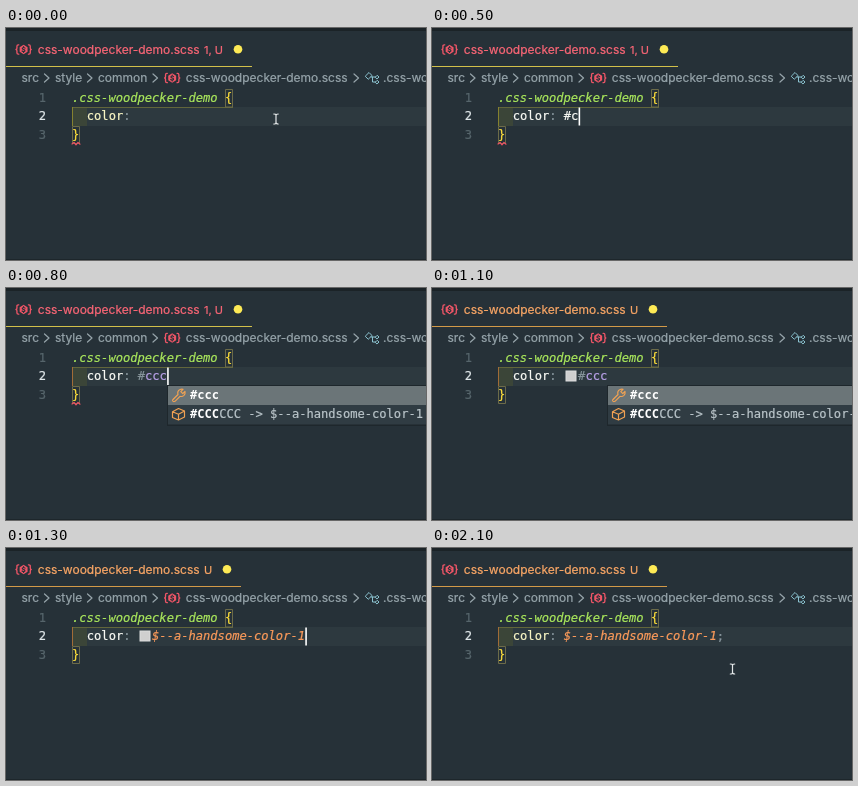
These frames come from a looping animation (420 by 232 pixels, 2.2 s). An HTML page:

```html
<!DOCTYPE html>
<html lang="en">
<head>
<meta charset="utf-8">
<title>Stylesheet autocompletion</title>
<style>
html, body { margin: 0; width: 100%; height: 100%; overflow: hidden; background: #263138; }
svg { display: block; width: 420px; height: 232px; }
text { white-space: pre; }
text, tspan { fill: currentColor; stroke: currentColor; stroke-width: .22px; }
.ui { font: 12px Inter, "Open Sans", sans-serif; color: #97a5ab; }
.code { font: 12.1px "DejaVu Sans Mono", "Liberation Mono", monospace; color: #f8f9f4; }
.num { color: #56656b; }
.current { color: #dfe6e9; }
.selector { color: #aae85c; font-style: italic; }
.brace { color: #ffdf3a; }
.dim { color: #87959c; }
.hex { color: #b7a0e6; }
.var { color: #fb9a5a; font-style: italic; }
.bold { font-weight: bold; color: #fff; stroke-width: 0; }
.option { color: #b9c4c9; }
.line { fill: none; stroke-width: 1.2; stroke-linecap: round; stroke-linejoin: round; }
</style>
</head>
<body>
<svg viewBox="0 0 420 232">
  <defs>
    <g id="file" transform="scale(.9)">
      <path class="line" stroke="#ee5567" style="stroke-width:1.5" d="M-5.4-5.2h-.6q-1.4 0-1.4 1.5v2q0 1.5-1 1.7q1 .2 1 1.7v2q0 1.5 1.4 1.5h.6M5.4-5.2h.6q1.4 0 1.4 1.5v2q0 1.5 1 1.7q-1 .2-1 1.7v2q0 1.5-1.4 1.5h-.6"/>
      <path fill="#ee5567" d="M0-5.2L4.4-2.6V2.6L0 5.2L-4.4 2.6V-2.6Z"/>
      <path class="line" stroke="#263138" d="M1.6-1.6Q0-2.8-1.4-1.6Q-1.8-.4 0 0Q1.8.5 1.4 1.7Q0 2.8-1.7 1.6M0-3.4v1M0 2.4v1"/>
    </g>
    <path id="chevron" class="line" stroke="#97a5ab" d="M-2.5-4L2 0L-2.5 4"/>
  </defs>
  <rect width="420" height="232" fill="#263138"/>
  <rect width="420" height="3" fill="#1b2327"/>
  <rect y="231" width="420" height="1" fill="#1d262b"/>

  <use href="#file" x="17.6" y="21.5"/>
  <g id="tab" class="ui">
    <text x="31.8" y="25.8">css-woodpecker-demo.scss</text>
    <text id="status" x="198" y="25.6" style="font-size:11px"></text>
  </g>
  <circle id="dot" cy="21.3" r="4.3" fill="#fdea55"/>
  <rect id="underline" y="38" height="1"/>

  <g class="ui">
    <text x="15.5" y="54">src</text>
    <text x="49" y="54">style</text>
    <text x="92" y="54">common</text>
    <text x="179.8" y="54">css-woodpecker-demo.scss</text>
    <text x="377" y="54">.css-woodpecker-demo</text>
  </g>
  <use href="#chevron" x="41" y="50"/>
  <use href="#chevron" x="84" y="50"/>
  <use href="#chevron" x="149.5" y="50"/>
  <use href="#chevron" x="350.5" y="50"/>
  <use href="#file" x="166.2" y="50"/>
  <path class="line" stroke="#8cc4d1" style="stroke-width:1" d="M359.5 48L363 44.5L366 47.5L362.5 51ZM365 49H369.5M366.5 49V54H369.5M369.5 49L371.2 47.3L373 49L371.2 50.7ZM369.5 54L371.2 52.3L373 54L371.2 55.7Z"/>

  <rect x="66" y="79" width="354" height="19" fill="#2d393f"/>
  <rect x="66" y="79" width="15" height="19" fill="#3b4538"/>
  <path stroke="#62663b" d="M66 79.5H227"/>
  <path id="guide" d="M66.5 79V98"/>
  <path fill="none" stroke="#6c6b49" d="M219.5 61.5h7v17.5h-7ZM66.5 98.5h7v17h-7Z"/>
  <g class="code">
    <text class="num" x="32.8" y="73.8">1</text>
    <text class="current" x="32.8" y="92.2">2</text>
    <text class="num" x="32.8" y="110.6">3</text>
    <text x="66" y="73.8"><tspan class="selector">.css-woodpecker-demo</tspan><tspan class="brace"> {</tspan></text>
    <text class="brace" x="66" y="110.6">}</text>
    <text id="property" x="80.8" y="92.2">color<tspan class="dim">:</tspan></text>
    <text id="value" y="92.2"></text>
  </g>
  <path id="squiggle" class="line" stroke="#ef5265" d="M66 116l2-1.6l2 2.4l2-2.4l2 1.8"/>
  <rect id="swatch" x="134" y="83" width="10" height="10" fill="#cfcfcf" stroke="#dcdddd"/>
  <rect id="caret" y="79.5" width="1.6" height="18" fill="#fff"/>

  <g id="popup">
    <rect x="-1" y="97" width="270" height="41" fill="#1e272c"/>
    <rect y="98" width="270" height="38.5" fill="#303c43"/>
    <rect id="selected" width="270" height="19" fill="#6b7578"/>
    <path class="line" stroke="#f1a253" d="M5 111.5L10 106.5Q9 103 12 101.5Q13.5 100.7 15 101.3L12.8 103.7L14.8 105.7L17 103.4Q17.5 106 16 107.4Q14.2 109 12 108.3L7 113.3Q5.5 114 4.7 113Q4.2 112.2 5 111.5Z"/>
    <path class="line" stroke="#f1a253" d="M4.5 123.8L10.5 120.5L16.5 123V129L10.5 132L4.5 129.5ZM4.5 123.8L10.5 126.3L16.5 123M10.5 126.3V132"/>
    <g class="code">
      <text class="bold" x="22" y="111.4">#ccc</text>
      <text class="option" x="22" y="130.2"><tspan class="bold">#CCC</tspan>CCC -&gt; $--a-handsome-color-1</text>
    </g>
  </g>
  <path id="pointer" class="line" stroke="#e3e7e8" d="M-2.2-5Q0-5 0-3.6Q0-5 2.2-5M0-3.6V3.6M-2.2 5Q0 5 0 3.6Q0 5 2.2 5"/>
</svg>
<script>
const LOOP = 2200, CHAR = 7.285, VALUE_X = 80.8 + 7 * CHAR, SWATCH_WIDTH = 14.3;
const part = id => document.getElementById(id);
const set = (id, attrs) => {
  for (const name in attrs) part(id).setAttribute(name, attrs[name]);
};
const show = (id, on) => set(id, { visibility: on ? "visible" : "hidden" });
const span = (kind, text) => `<tspan class="${kind}">${text}</tspan>`;
const within = (t, from, to) => t >= from && t < to;

// Each keystroke or completion: start time and resulting value.
const edits = [
  [0, ""], [200, " "], [400, " #"], [500, " #c"], [600, " #ccc"],
  [1300, " $--a-handsome-color-1"], [1800, " $--a-handsome-color-1;"]
];

function paintValue(text) {
  if (text.startsWith("$")) {
    const end = text.endsWith(";") ? ";" : "";
    return span("var", text.replace(";", "")) + span("dim", end);
  }
  return text === "#ccc" ? span("dim", "#") + span("hex", "ccc") : text;
}

function draw(t) {
  const typed = edits.filter(([start]) => start <= t).pop()[1];
  const text = typed.trim();
  const valid = t >= 1000;
  const hasSwatch = within(t, 1000, 2000);
  const valueX = VALUE_X + (hasSwatch ? SWATCH_WIDTH : 0);
  const caretX = typed ? valueX + text.length * CHAR : VALUE_X - CHAR;

  part("tab").style.color = valid ? "#fba766" : "#fb6676";
  part("status").textContent = valid ? "U" : "1, U";
  set("dot", { cx: valid ? 221 : 232 });
  set("underline", { width: valid ? 235 : 246, fill: valid ? "#d39a48" : "#d2c04a" });
  set("guide", { stroke: t < 600 ? "#85812f" : "#a16c37" });
  show("squiggle", !valid);

  part("property").style.color = within(t, 100, 2000) ? "#f8f9f4" : "#f8f5c4";
  set("value", { x: valueX });
  part("value").innerHTML = paintValue(text);
  show("swatch", hasSwatch);

  set("caret", { x: caretX + .2 });
  show("caret", within(t, 100, 1100) || within(t, 1300, 1600) || within(t, 1800, 2100));

  show("popup", within(t, 600, 1300));
  set("popup", { transform: `translate(${hasSwatch ? 176 : 162} 0)` });
  set("selected", { y: t < 1200 ? 98 : 117 });

  const atEnd = t >= 2000;
  show("pointer", t < 200 || atEnd);
  set("pointer", { transform: atEnd ? "translate(300.5 121)" : "translate(270 91)" });
}

const start = performance.now();
let lastStep = -1;
function tick() {
  const t = (performance.now() - start) % LOOP;
  const step = Math.floor(t / 100);
  if (step !== lastStep) draw(step * 100);
  lastStep = step;
  requestAnimationFrame(tick);
}
tick();
</script>
</body>
</html>
```
